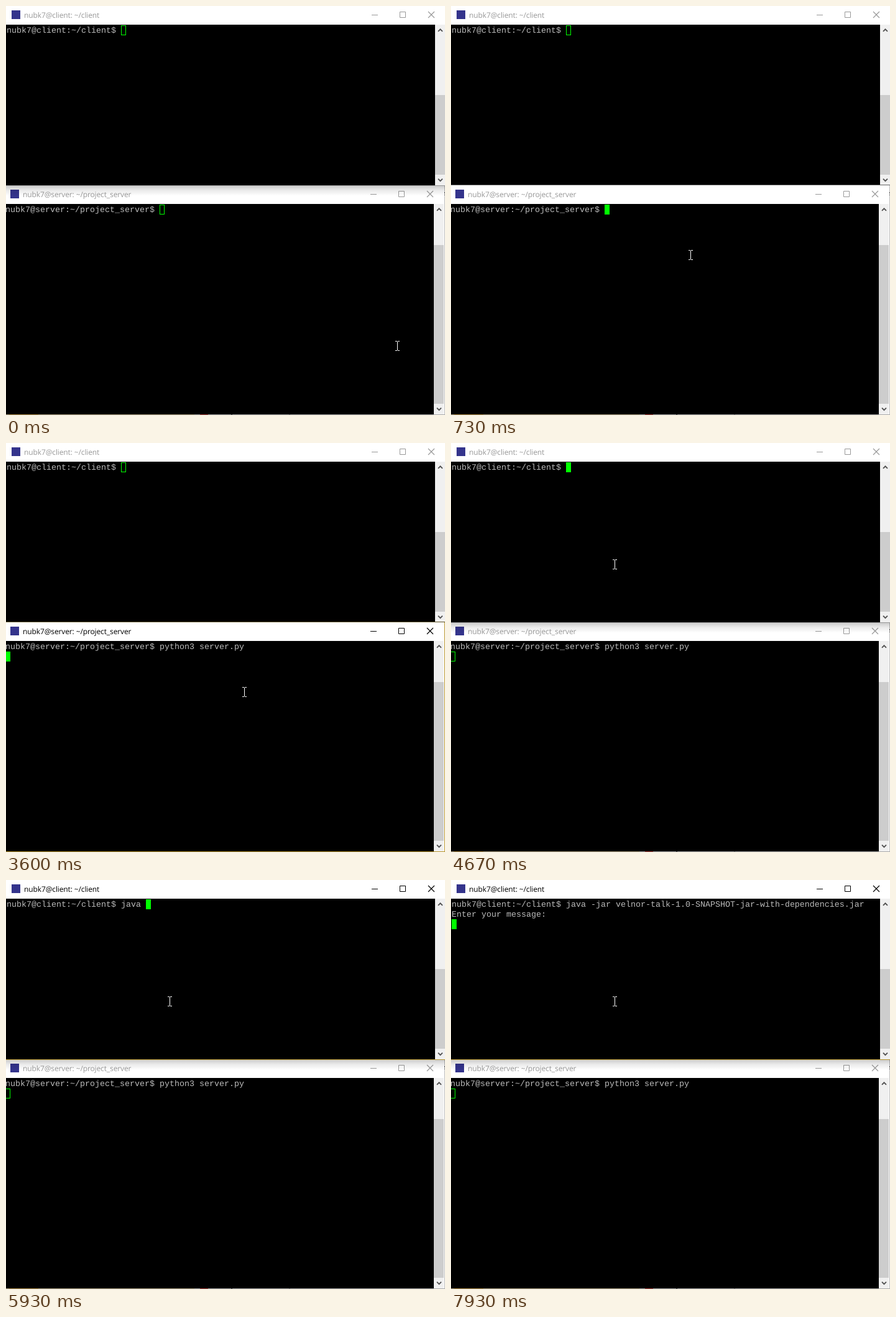
Recreate the animation shown at these times as an HTML page. Size 706 by 657 pixels, loop 8000 ms.

```html
<!DOCTYPE html>
<html lang="en">
<head>
<meta charset="utf-8">
<title>Two terminals</title>
<style>
  html, body { margin: 0; width: 100%; height: 100%; overflow: hidden; background: #000; }
  svg { display: block; width: 706px; height: 657px; }
  text { white-space: pre; text-rendering: geometricPrecision; }
  .title { font: 12px "Open Sans", "Noto Sans", sans-serif; letter-spacing: -.12px; }
  .row { font: 13.333px "Liberation Mono", "Courier New", monospace; fill: #bbb; }
  .crisp { shape-rendering: crispEdges; }
</style>
</head>
<body>
<svg id="stage" viewBox="0 0 706 657">
  <defs>
    <linearGradient id="shade" x1="0" y1="0" x2="0" y2="1">
      <stop offset="0" stop-opacity=".2"/>
      <stop offset=".45" stop-opacity=".08"/>
      <stop offset="1" stop-opacity="0"/>
    </linearGradient>
  </defs>
  <g id="windows"></g>
  <g id="mouse"></g>
</svg>
<script>
const LOOP = 8000, CELL = 8, LINE = 16;
const GOLD = '#b8962e';

function el(parent, tag, attrs, text) {
  const node = document.createElementNS('http://www.w3.org/2000/svg', tag);
  for (const key in attrs) node.setAttribute(key, attrs[key]);
  if (text) node.textContent = text;
  parent.appendChild(node);
  return node;
}

function rect(parent, x, y, width, height, fill, extra) {
  return el(parent, 'rect', { x, y, width, height, fill, class: 'crisp', ...extra });
}

const layer = document.getElementById('windows');

// Builds one terminal; dx, dy shift the shared window layout.
function makeWindow({ dx, dy, bottom, title, thumbTop, thumbEnd }) {
  const g = el(layer, 'g', {});
  rect(g, 0, dy, 706, 30, '#fff');
  rect(g, 0, dy + 30, 690 + dx, bottom - dy - 30, '#000');
  rect(g, 9 + dx, dy + 7, 14, 14, '#34348c');
  const name = el(g, 'text', { x: 29 + dx, y: dy + 19, class: 'title' }, title);
  const buttons = el(g, 'g', { transform: `translate(${dx} ${dy})`, fill: 'none' });
  el(buttons, 'path', { d: 'M588 14.5h10M633.5 9.5h9v9h-9z' });
  el(buttons, 'path', { d: 'M679 9l10 10M689 9l-10 10', 'stroke-width': 1.2 });

  const bar = 690 + dx;
  rect(g, bar, dy + 30, 16, bottom - dy - 30, '#f0f0f0');
  rect(g, bar, thumbTop, 16, thumbEnd - thumbTop, '#cdcdcd');
  el(g, 'path', {
    d: `M${bar + 5} ${dy + 40.8}l3.5 -3.5l3.5 3.5M${bar + 5} ${bottom - 10.3}l3.5 3.5l3.5 -3.5`,
    fill: 'none', stroke: '#505050', 'stroke-width': 1.8
  });

  const rows = [0, 1].map(i =>
    el(g, 'text', { x: 1 + dx, y: dy + 43 + i * LINE, class: 'row' }));
  const caret = el(g, 'rect', { class: 'crisp', stroke: '#0f0' });

  return {
    g,
    draw(lines, caretRow, active, focused) {
      rows.forEach((row, i) => { row.textContent = lines[i] || ''; });
      const column = (lines[caretRow] || '').length;
      const box = {
        x: 1 + dx + column * CELL + .5, y: dy + 31 + caretRow * LINE + .5,
        width: CELL - 1, height: LINE - 1, fill: focused ? '#0f0' : 'none'
      };
      for (const key in box) caret.setAttribute(key, box[key]);
      name.setAttribute('fill', active ? '#000' : '#999');
      buttons.setAttribute('stroke', active ? '#000' : '#999');
    }
  };
}

const server = makeWindow({
  dx: -2, dy: 288, bottom: 656, title: 'nubk7@server: ~/project_server',
  thumbTop: 384, thumbEnd: 639
});
const topEdge = rect(server.g, 0, 287, 706, 1, '#666');
rect(server.g, 704, 318, 1, 338, '#fff');
const sideEdge = rect(server.g, 705, 288, 1, 369, '#bbb');
const bottomEdge = rect(server.g, 0, 656, 706, 1, '#aaa');

// Hints of the desktop showing through the inactive border.
const backdrop = el(server.g, 'g', {});
rect(backdrop, 0, 656, 303, 1, '#b0a484');
rect(backdrop, 5, 656, 47, 1, '#b8944c');
rect(backdrop, 312, 656, 13, 1, '#b04842');
rect(backdrop, 362, 656, 2, 1, '#555');
rect(backdrop, 455, 656, 2, 1, '#888');
rect(backdrop, 705, 299, 1, 2, '#444');
rect(backdrop, 705, 303, 1, 1, '#444');

const client = makeWindow({
  dx: 0, dy: 0, bottom: 288, title: 'nubk7@client: ~/client',
  thumbTop: 143, thumbEnd: 271
});
const clientEdge = rect(client.g, 0, 288, 706, 1, '#999');
rect(client.g, 0, 289, 706, 16, 'url(#shade)');

const mouse = document.getElementById('mouse');
const beam = el(mouse, 'path', {
  d: 'M-3 -8h3v1h1v-1h3v1h-3v14h3v1h-3v-1h-1v1h-3v-1h3v-14h-3z',
  fill: '#fff', class: 'crisp'
});
const arrow = el(mouse, 'path', {
  d: 'M.5 .5v16l3.7 -3.5l2.5 5.5l2.3 -1l-2.4 -5.4h5z',
  fill: '#fff', stroke: '#000'
});

// Pointer stops: time, x, y.
const PATH = [
  [0, 629, 546], [70, 652, 580], [136, 683, 622], [202, 690, 632],
  [267, 672, 608], [333, 600, 545], [399, 500, 470], [464, 415, 415],
  [530, 385, 400], [1200, 383, 400], [4130, 151, 324], [4400, 168, 304],
  [4466, 205, 258], [4532, 245, 213], [4598, 263, 195]
];

// Server and client screens: time, text lines, caret row.
const SERVER_PROMPT = 'nubk7@server:~/project_server$ ';
const CLIENT_PROMPT = 'nubk7@client:~/client$ ';
const RUN_SERVER = SERVER_PROMPT + 'python3 server.py';
const RUN_CLIENT = CLIENT_PROMPT + 'java -jar velnor-talk-1.0-SNAPSHOT-jar-with-dependencies.jar';
const SERVER_LOG = [
  [0, [SERVER_PROMPT], 0],
  [2130, [SERVER_PROMPT + 'clear'], 0],
  [2670, [RUN_SERVER], 0],
  [3600, [RUN_SERVER], 1]
];
const CLIENT_LOG = [
  [0, [CLIENT_PROMPT], 0],
  [5930, [CLIENT_PROMPT + 'java '], 0],
  [6470, [RUN_CLIENT], 0],
  [7530, [RUN_CLIENT], 1],
  [7930, [RUN_CLIENT, 'Enter your message:'], 2]
];

const latest = (list, t) => list.filter(item => item[0] <= t).pop();

function render(t) {
  const serverFocus = t >= 730 && t < 4664, serverActive = t >= 800 && t < 4664;
  const clientFocus = t >= 4664, clientActive = t >= 4730;

  const front = serverFocus ? server : client;
  if (layer.lastChild !== front.g) layer.appendChild(front.g);

  const [, serverLines, serverRow] = latest(SERVER_LOG, t);
  const [, clientLines, clientRow] = latest(CLIENT_LOG, t);
  server.draw(serverLines, serverRow, serverActive, serverFocus);
  client.draw(clientLines, clientRow, clientActive, clientFocus);

  topEdge.setAttribute('fill', serverActive ? '#5e5326' : '#666');
  sideEdge.setAttribute('fill', serverActive ? GOLD : '#bbb');
  bottomEdge.setAttribute('fill', serverActive ? GOLD : '#aaa');
  backdrop.setAttribute('visibility', serverActive ? 'hidden' : 'visible');
  clientEdge.setAttribute('fill', clientActive ? GOLD : '#999');

  const [, x, y] = latest(PATH, t);
  const overChrome = x >= 688 || (y >= 288 && y < 318);
  mouse.setAttribute('transform', `translate(${x} ${y})`);
  beam.setAttribute('visibility', overChrome ? 'hidden' : 'visible');
  arrow.setAttribute('visibility', overChrome ? 'visible' : 'hidden');
}

const start = performance.now();
function tick() {
  render((performance.now() - start) % LOOP);
  requestAnimationFrame(tick);
}
tick();
</script>
</body>
</html>
```
